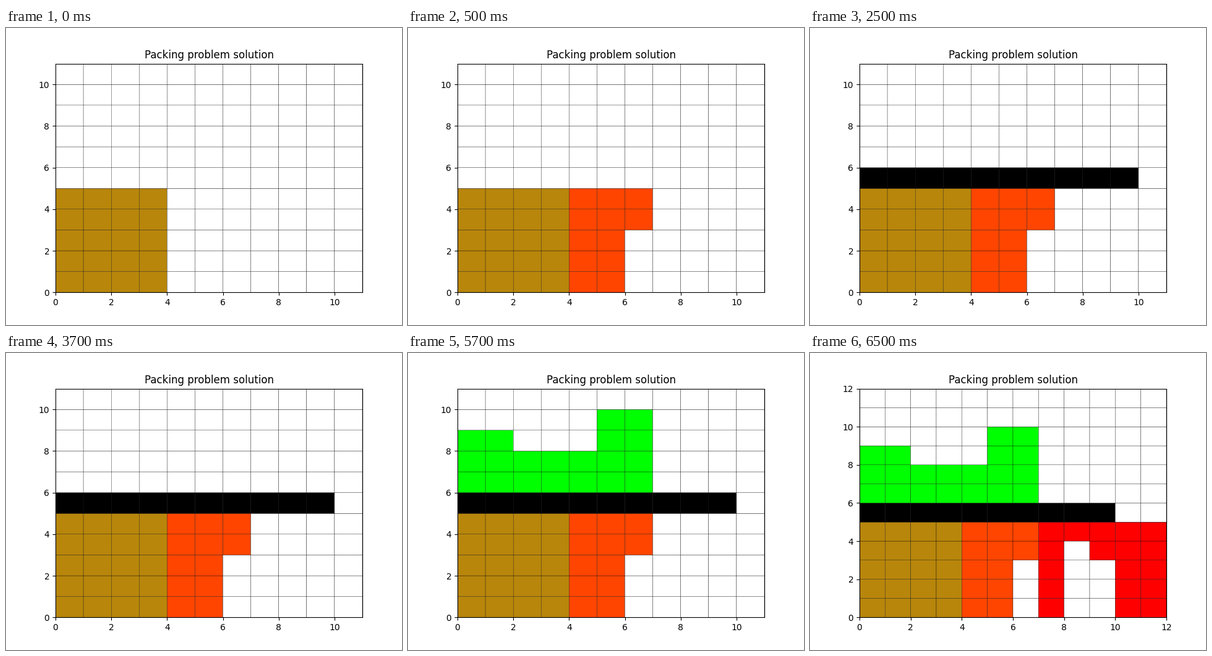
Recreate the animation shown at these times as a matplotlib script. Size 640 px wide and 480 px high, loop 8000 ms.

```python
import numpy as np
import matplotlib.pyplot as plt
from matplotlib.animation import FuncAnimation
from matplotlib.colors import ListedColormap

STEP_MS = 500
LOOP_MS = 8000
PIECE_MS = 2000
MIN_SIZE = 11

y, x = np.mgrid[:12, :12]
lower = y < 5

# Shapes in order of placement, as rules over the unit cells.
PIECES = {
    "darkgoldenrod": lower & (x < 4),
    "orangered": lower & (x >= 4) & (x < np.where(y < 3, 6, 7)),
    "black": (y == 5) & (x < 10),
    "lime": (y >= 6) & (x < 7) & (y < 8 + (x < 2) + 2 * (x >= 5)),
    "red": lower & (x >= 7) & (y >= 4 * (x == 8) + 3 * (x == 9)),
}
CMAP = ListedColormap(["white", *PIECES])

plt.rcParams["font.family"] = "DejaVu Sans"
fig, ax = plt.subplots(figsize=(6.4, 4.8), dpi=100)


def draw(frame):
    # The first piece has already been lying for most of its turn.
    placed = 1 + (frame * STEP_MS + PIECE_MS - 500) // PIECE_MS
    cells = sum(i * mask for i, mask in enumerate(PIECES.values(), 1) if i <= placed)
    size = max(MIN_SIZE, x[cells > 0].max() + 1)
    ax.clear()
    ax.set_title("Packing problem solution")
    ax.pcolor(cells[:size, :size], cmap=CMAP, vmin=0, vmax=len(PIECES),
              edgecolors="black", linewidths=0.25)
    return []


anim = FuncAnimation(fig, draw, frames=LOOP_MS // STEP_MS, interval=STEP_MS,
                     init_func=lambda: draw(0), repeat=True, repeat_delay=0)
plt.show()
```
